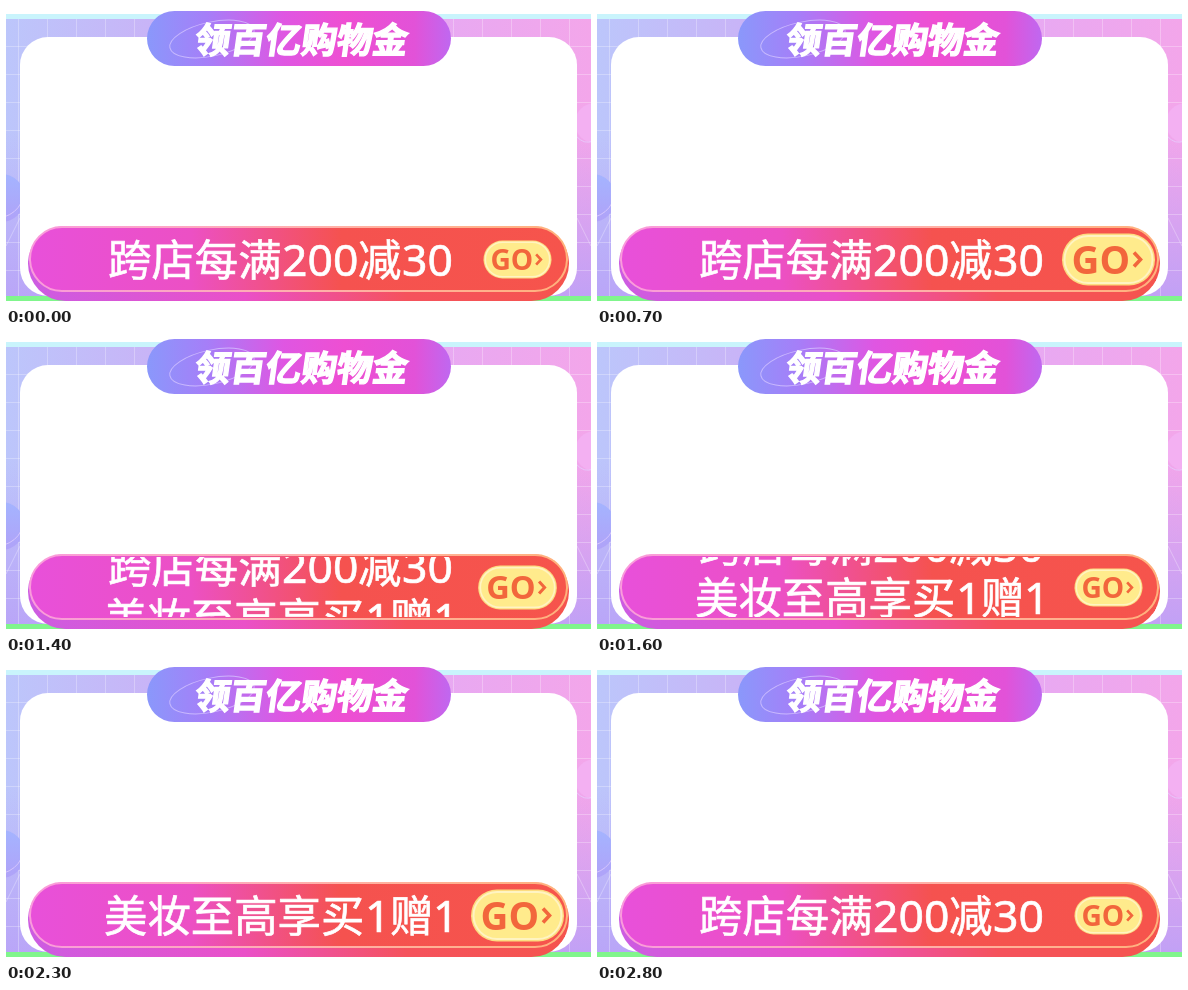
An HTML page for the animation above (2900 ms loop, 585x300 px).

```html
<!DOCTYPE html>
<html lang="zh">
<head>
<meta charset="utf-8">
<title>购物金</title>
<style>
  html, body { margin: 0; width: 100%; height: 100%; overflow: hidden; background: #fff; }
  svg { display: block; width: 585px; height: 300px; }
  .title { font: 900 35.5px "Noto Sans CJK SC", "Noto Sans CJK", sans-serif; fill: #fff; stroke: #fff; stroke-width: 1.4; }
  .offer { font: 400 43.4px "Noto Sans CJK SC", "Noto Sans CJK", sans-serif; fill: #fff; stroke: #fff; stroke-width: .7; }
  .num { font: 400 44.5px "Noto Sans", sans-serif; }
  .go { font: 700 38.5px "Open Sans", sans-serif; fill: #f2663c; }
</style>
</head>
<body>
<svg viewBox="0 0 585 300">
  <defs>
    <linearGradient id="sky">
      <stop offset="0" stop-color="#bcc6fb"/>
      <stop offset=".3" stop-color="#cbb0f6"/>
      <stop offset=".75" stop-color="#e8a9f2"/>
      <stop offset="1" stop-color="#f3a6ea"/>
    </linearGradient>
    <linearGradient id="dusk" x2="0" y2="1">
      <stop offset=".4" stop-color="#b9a0f7" stop-opacity="0"/>
      <stop offset="1" stop-color="#b9a0f7" stop-opacity=".85"/>
    </linearGradient>
    <linearGradient id="badge">
      <stop offset="0" stop-color="#8a98fb"/>
      <stop offset=".2" stop-color="#a67ef8"/>
      <stop offset=".45" stop-color="#df56e2"/>
      <stop offset=".65" stop-color="#ee4fd2"/>
      <stop offset=".88" stop-color="#e252d8"/>
      <stop offset="1" stop-color="#bf68f0"/>
    </linearGradient>
    <linearGradient id="face">
      <stop offset="0" stop-color="#e850da"/>
      <stop offset=".3" stop-color="#ec50c4"/>
      <stop offset=".58" stop-color="#f5524f"/>
      <stop offset="1" stop-color="#f6544c"/>
    </linearGradient>
    <linearGradient id="rim">
      <stop offset="0" stop-color="#cc5ce2"/>
      <stop offset=".4" stop-color="#ea50c8"/>
      <stop offset=".7" stop-color="#f5525c"/>
      <stop offset="1" stop-color="#f5544e"/>
    </linearGradient>
    <linearGradient id="edge">
      <stop offset="0" stop-color="#fa9bdc"/>
      <stop offset=".5" stop-color="#ffb0ae"/>
      <stop offset="1" stop-color="#ffb27c"/>
    </linearGradient>
    <linearGradient id="ball" x2="0" y2="1">
      <stop offset="0" stop-color="#a4b4ff"/>
      <stop offset="1" stop-color="#b0a2f8"/>
    </linearGradient>
    <pattern id="grid" width="29" height="28" patternUnits="userSpaceOnUse" y="12">
      <path d="M0 .5H29M12.5 0V28" stroke="#fff" stroke-opacity=".28" fill="none"/>
    </pattern>
    <clipPath id="window"><rect x="60" y="223" width="400" height="60"/></clipPath>
  </defs>

  <rect y="8" width="585" height="5" fill="#c9f4fc"/>
  <rect y="13" width="585" height="277" fill="url(#sky)"/>
  <rect y="13" width="585" height="277" fill="url(#dusk)"/>
  <rect y="13" width="585" height="277" fill="url(#grid)"/>
  <circle cx="-5" cy="192" r="24" fill="url(#ball)"/>
  <circle cx="589" cy="117" r="20" fill="#f3b0f2"/>
  <path d="M-2 211Q10 207 15 197M570 130Q578 139 587 135" stroke="#e6d2ff" stroke-opacity=".7" fill="none"/>
  <path d="M0 240L14 212M571 212L585 240" stroke="#fff" stroke-opacity=".3"/>
  <rect y="290" width="585" height="5" fill="#80f58c"/>
  <rect x="14" y="31" width="557" height="259" rx="28" fill="#fff"/>

  <rect x="141" y="5" width="304" height="55" rx="27.5" fill="url(#badge)"/>
  <ellipse cx="206" cy="33" rx="43" ry="17" transform="rotate(-12 206 33)" fill="none" stroke="#d9c8ff" stroke-opacity=".75"/>
  <text class="title" transform="translate(187.5 47) skewX(-8)">领百亿购物金</text>

  <rect x="22" y="220" width="541" height="75" rx="37.5" fill="url(#rim)"/>
  <rect x="24" y="221" width="537" height="64" rx="32" fill="url(#face)" stroke="url(#edge)" stroke-width="2"/>

  <g clip-path="url(#window)">
    <g id="offers" class="offer">
      <text id="discount" y="270"><tspan x="102">跨店每满</tspan><tspan class="num" x="276">200</tspan><tspan x="352">减</tspan><tspan class="num" x="396">30</tspan></text>
      <text y="322"><tspan x="98">美妆至高享买</tspan><tspan class="num" x="359">1</tspan><tspan x="384">赠</tspan><tspan class="num" x="427">1</tspan></text>
      <use href="#discount" y="104"/>
    </g>
  </g>

  <g id="button">
    <rect x="-46.5" y="-26" width="93" height="52" rx="26" fill="#fddc80"/>
    <rect x="-44" y="-23.5" width="88" height="47" rx="23.5" fill="#ffeb8c" stroke="#fff4c2" stroke-width="2"/>
    <text class="go" x="-37" y="14">GO</text>
    <path d="M25.5 -7L32 0L25.5 7" fill="none" stroke="#f2663c" stroke-width="3.6"/>
  </g>
</svg>
<script>
const LOOP = 2900;
const TICKS = [0, 500, 600, 700, 900, 1100, 1300, 1400, 1500, 1600, 1700,
  1800, 1900, 2100, 2300, 2500, 2600, 2700, 2800];
const WIDTH = [[0, 68], [500, 76], [700, 93], [900, 93], [1100, 91], [1300, 84],
  [1600, 68], [1800, 82], [1900, 88], [2100, 93], [2300, 93], [2500, 88], [2800, 68]];
const SCROLL = [[0, 0], [1200, 0], [1700, 52], [2400, 52], [2800, 104]];

const offers = document.getElementById("offers");
const button = document.getElementById("button");

// Linear interpolation through [time, value] points.
function valueAt(points, t) {
  const next = points.findIndex(([time]) => time > t);
  if (next < 0) return points[points.length - 1][1];
  const [t0, v0] = points[next - 1], [t1, v1] = points[next];
  return v0 + (v1 - v0) * (t - t0) / (t1 - t0);
}

function draw(now) {
  const t = TICKS.filter(tick => tick <= now % LOOP).pop();
  offers.setAttribute("transform", `translate(0 ${-valueAt(SCROLL, t)})`);
  button.setAttribute("transform", `translate(511.5 253.5) scale(${valueAt(WIDTH, t) / 93})`);
}

let start;
function loop(now) {
  start ??= now;
  draw(now - start);
  requestAnimationFrame(loop);
}
draw(0);
requestAnimationFrame(loop);
</script>
</body>
</html>
```
